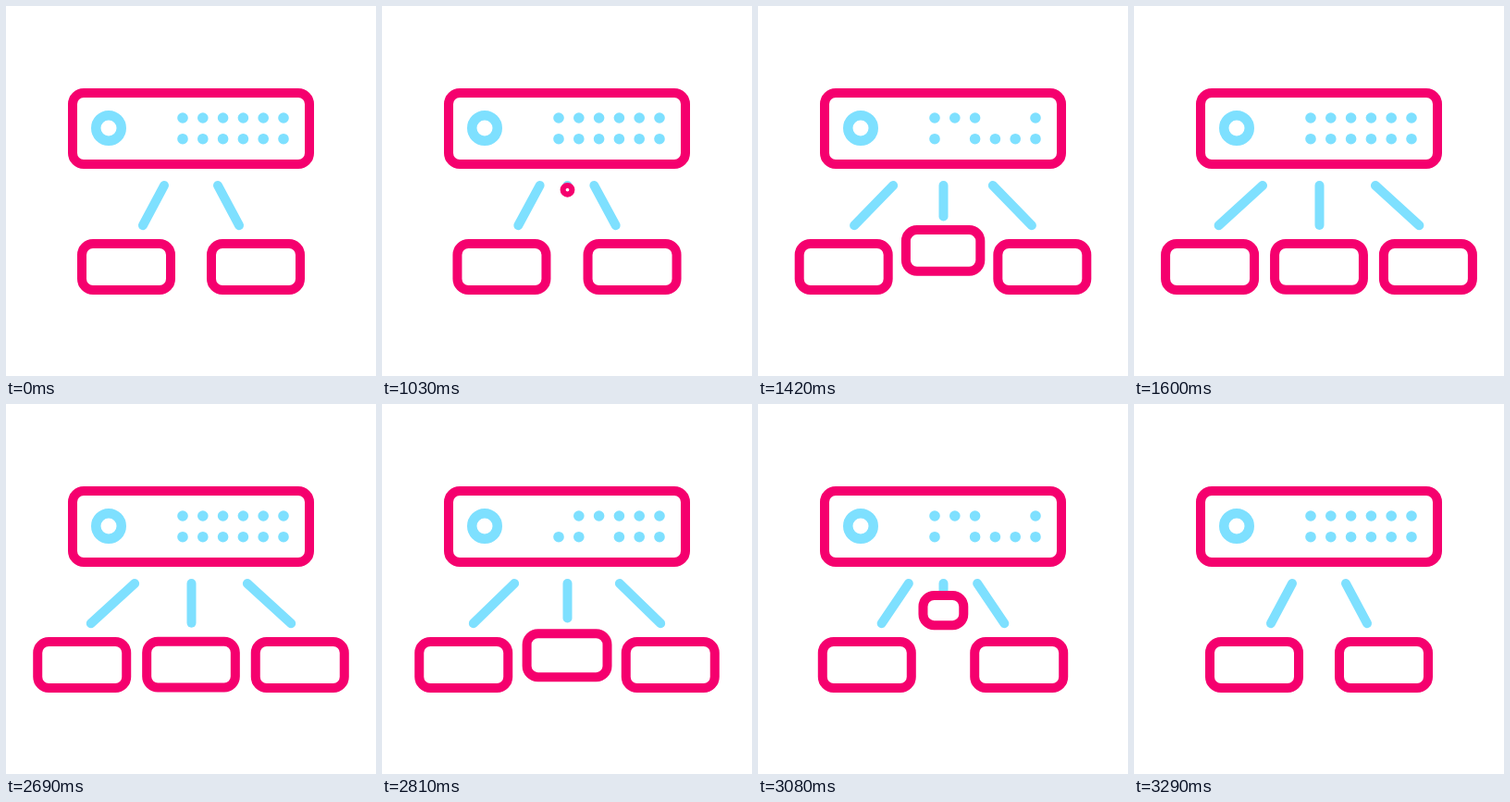
An HTML page with a canvas for the animation above (3.32 s loop, 400 px wide and 400 px high).

```html
<!DOCTYPE html>
<html lang="en">
<head>
<meta charset="utf-8">
<title>Server nodes</title>
<style>
html, body { margin: 0; width: 100%; height: 100%; overflow: hidden; background: #fff; }
canvas { display: block; width: 100%; height: 100%; }
</style>
</head>
<body>
<canvas id="stage" width="400" height="400"></canvas>
<script>
const ctx = document.getElementById('stage').getContext('2d');
const PINK = '#f5006e', CYAN = '#7ee0ff';
const LOOP = 3320, STEP = 30, MOVE = 630;
const OPEN = 1030, CLOSE = 2690;

// Status lights: column, row, time off, time on again
const BLINKS = [
  [2, 1, 60, 210],
  [0, 0, 120, 330],
  [5, 1, 180, 390],
  [3, 0, 250, 450],
  [1, 1, 330, 480],
  [4, 0, 360, 510]
];

const lerp = (a, b, k) => a + (b - a) * k;
const ease = x => (1 - Math.cos(Math.PI * x)) / 2;
const since = (t, start) => Math.floor((t - start) / STEP) * STEP;

function box(cx, cy, w, h, line = 10) {
  ctx.beginPath();
  ctx.roundRect(cx - w / 2, cy - h / 2, w, h, Math.min(12, w / 2, h / 2));
  ctx.fillStyle = '#fff';
  ctx.fill();
  ctx.strokeStyle = PINK;
  ctx.lineWidth = line;
  ctx.stroke();
}

function cable(x1, y1, x2, y2) {
  ctx.beginPath();
  ctx.moveTo(x1, y1);
  ctx.lineTo(x2, y2);
  ctx.strokeStyle = CYAN;
  ctx.lineWidth = 10;
  ctx.lineCap = 'round';
  ctx.stroke();
}

function disc(x, y, r) {
  ctx.beginPath();
  ctx.arc(x, y, r, 0, Math.PI * 2);
}

function server(clock) {
  box(200, 132.5, 256, 77);
  disc(111, 132, 13.75);
  ctx.strokeStyle = CYAN;
  ctx.lineWidth = 10.5;
  ctx.stroke();
  ctx.fillStyle = CYAN;
  for (let row = 0; row < 2; row++) {
    for (let col = 0; col < 6; col++) {
      const off = BLINKS.some(([c, r, from, to]) =>
        c === col && r === row && clock >= from && clock < to);
      if (off) continue;
      disc(191 + col * 21.8, 121 + row * 22.7, 5.8);
      ctx.fill();
    }
  }
}

// The new node grows out of the server, then widens while it drops
function middleNode(x, p) {
  if (x < 0.01) return;
  const grow = Math.min(1, x * MOVE / 100);
  const w = grow * lerp(36, 106, p), h = grow * lerp(36, 60, p);
  const line = Math.min(10 * grow ** 0.6, h / 2);
  cable(200.5, 194, 200.5, lerp(194, 237, p));
  box(200.5 - p / 2, lerp(195, lerp(203, 282, p), grow), w - line, h - line, line);
}

function draw(t) {
  let x = 0, clock = -1;
  if (t >= CLOSE) {
    const el = since(t, CLOSE);
    x = 1 - Math.min(1, (el + 28) / MOVE);
    clock = el * 0.9 + 40;
  } else if (t >= OPEN) {
    clock = Math.min(since(t, OPEN), 570);
    x = (clock + 43) / MOVE;
  }
  const p = ease(x);

  ctx.clearRect(0, 0, 400, 400);
  server(clock);
  for (const side of [-1, 1]) {
    cable(200 + side * lerp(29, 61, p), 194, 200 + side * lerp(52, 108.5, p), 237.2);
    box(200 + side * lerp(70, 118, p), 282, 96, 50);
  }
  middleNode(x, p);
}

const start = performance.now();
function tick() {
  draw((performance.now() - start) % LOOP);
  requestAnimationFrame(tick);
}
tick();
</script>
</body>
</html>
```
